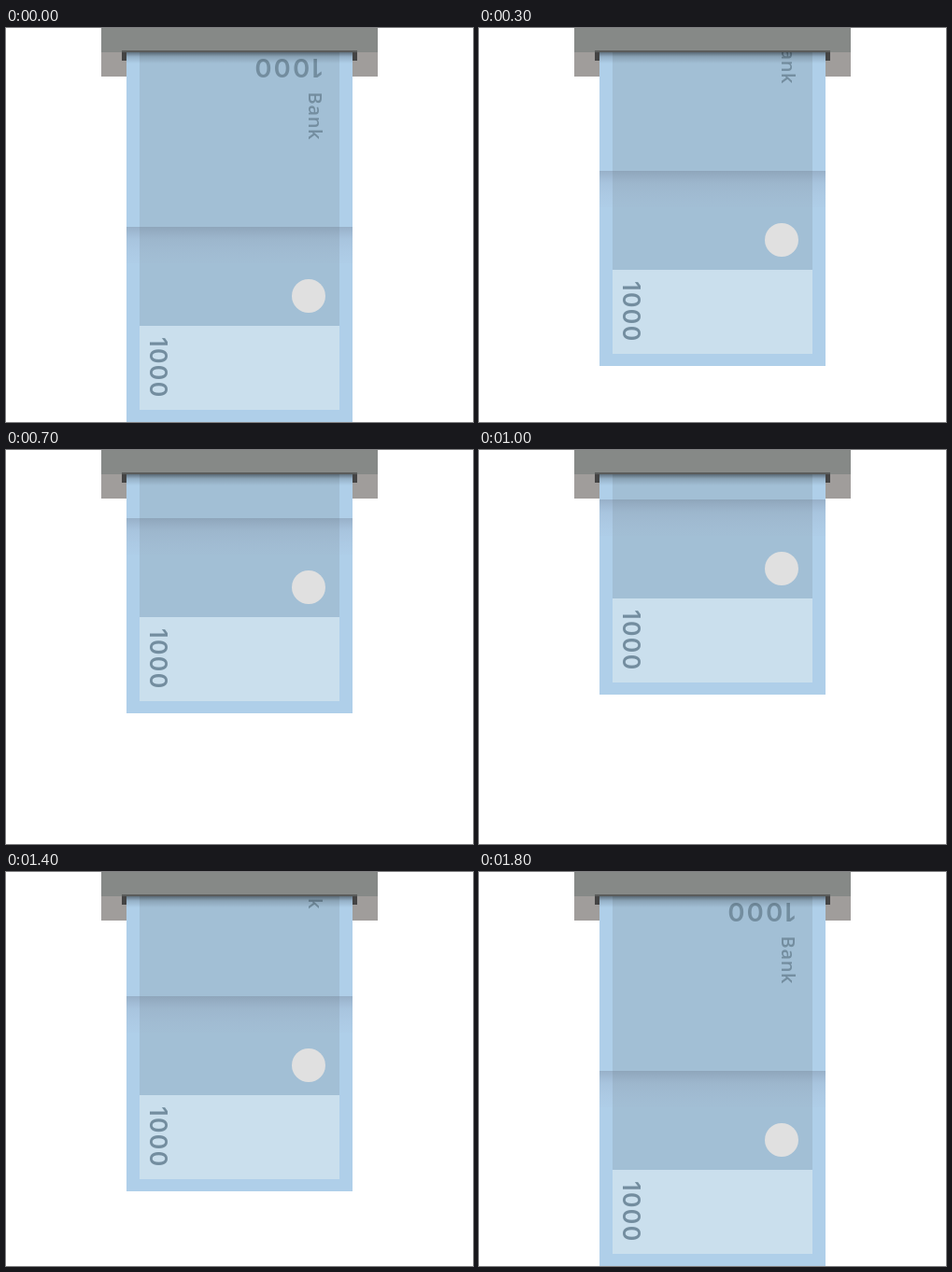
An HTML page that plays this animation: 500x422 px, repeating every 1900 ms.

```html
<!DOCTYPE html>
<html lang="en">
<head>
<meta charset="utf-8">
<title>Banknote</title>
<style>
  html, body { margin: 0; height: 100%; overflow: hidden; background: #fff; }
  svg { display: block; width: 500px; height: 422px; }
  text { fill: #738d9f; font: 600 25px Inter, sans-serif; }
  .value { letter-spacing: 1.4px; }
  .large { font-size: 27.5px; letter-spacing: 2.2px; }
  .bank { font: 600 20px "Open Sans", sans-serif; letter-spacing: .7px; }
</style>
</head>
<body>
<svg viewBox="0 0 500 422">
  <defs>
    <linearGradient id="fold" x2="0" y2="1">
      <stop stop-color="#646e82" stop-opacity=".32"/>
      <stop offset=".35" stop-color="#7d829b" stop-opacity=".14"/>
      <stop offset="1" stop-color="#a0a5c3" stop-opacity=".04"/>
    </linearGradient>
    <linearGradient id="shade" x2="0" y2="1">
      <stop stop-opacity=".45"/>
      <stop offset=".4" stop-opacity=".15"/>
      <stop offset="1" stop-opacity="0"/>
    </linearGradient>
    <clipPath id="below"><path d="M0 26H500V422H0Z"/></clipPath>
  </defs>

  <path fill="#a09d9b" d="M102 26H398V52H102Z"/>
  <path fill="#868987" d="M102 0H398V26H102Z"/>
  <path fill="#444" d="M124 25H376V35H124Z"/>
  <path fill="#5a5c5b" d="M124 24H376V26H124Z"/>

  <g clip-path="url(#below)">
    <g id="note">
      <path fill="#afcfe9" d="M129 0H371V422H129Z"/>
      <path fill="#a2bfd5" d="M143 0H357V319H143Z"/>
      <path fill="#cadfed" d="M143 319H357V409H143Z"/>
      <rect x="129" y="213" width="242" height="39" fill="url(#fold)"/>
      <circle cx="324" cy="287" r="18" fill="#e0e0e0"/>
      <text class="value large" transform="translate(339 32.5) rotate(180)">1000</text>
      <text class="bank" transform="translate(324 68.5) rotate(90)">Bank</text>
      <text class="value" transform="translate(154 331) rotate(90)">1000</text>
    </g>
    <rect x="129" y="26" width="242" height="12" fill="url(#shade)"/>
  </g>
</svg>
<script>
  const note = document.getElementById("note");
  const stepTime = 100, steps = 19, turn = 9, distance = 20;

  // The note is pulled in and pushed out again in even jumps.
  function draw(now) {
    const step = Math.floor(now / stepTime) % steps;
    const lift = distance * (turn - Math.abs(turn - step));
    note.setAttribute("transform", `translate(0 ${-lift})`);
    requestAnimationFrame(draw);
  }
  draw(0);
</script>
</body>
</html>
```
